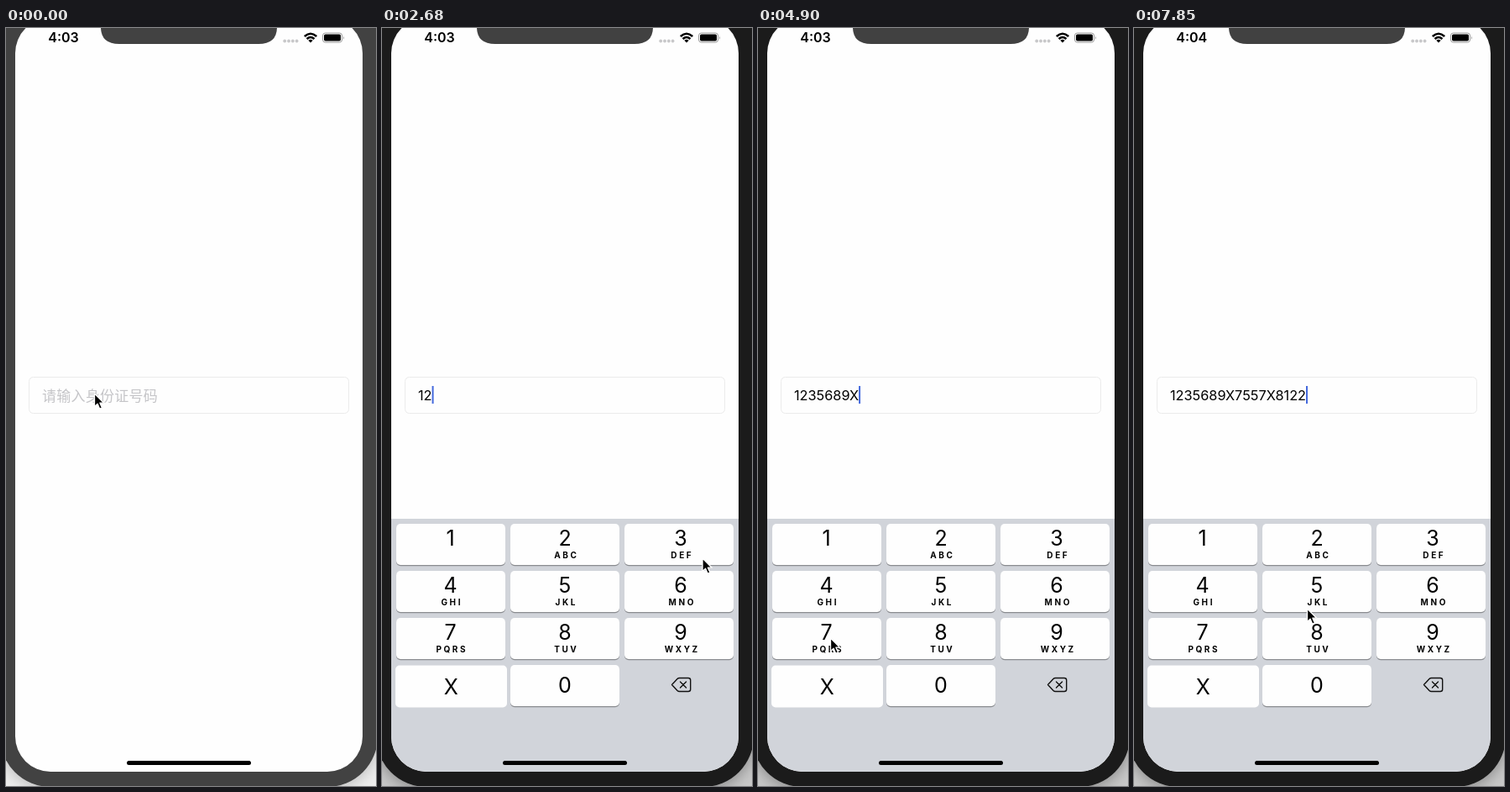
Write an HTML page that moves like this. It is 441x902 px and loops after 8 s.

```html
<!DOCTYPE html>
<html lang="zh-CN">
<head>
<meta charset="utf-8">
<title>ID keyboard</title>
<style>
  html, body { margin: 0; width: 100%; height: 100%; overflow: hidden; background: #ddd; }
  svg { display: block; width: 441px; height: 902px; font-family: Inter, Roboto, sans-serif; }
  .digit { font-size: 25px; text-anchor: middle; }
  .letters { font-size: 10px; font-weight: 700; letter-spacing: 2.6px; text-anchor: middle; }
  #hint { font: 17px "Noto Sans CJK SC", "Noto Sans CJK", sans-serif; letter-spacing: .25px; fill: #c5c5c8; }
  #entry { font-size: 16.3px; }
  #clock { font-size: 16px; font-weight: 600; }
</style>
</head>
<body>
<svg viewBox="0 0 441 902">
  <defs>
    <clipPath id="screen"><rect x="11" y="-12" width="414" height="897" rx="42"/></clipPath>
    <filter id="blur" x="-20%" y="-20%" width="140%" height="140%"><feGaussianBlur stdDeviation="9"/></filter>
  </defs>
  <rect id="desk" width="441" height="902"/>
  <rect id="shade" x="-7" y="-60" width="450" height="966" rx="60" filter="url(#blur)"/>
  <rect id="bezel" x="-7" y="-60" width="450" height="963" rx="60"/>
  <g clip-path="url(#screen)">
    <rect width="441" height="902" fill="#fefefe"/>
    <rect x="27.5" y="415.5" width="381" height="43" rx="5" fill="#fefefe" stroke="#ebebeb"/>
    <text id="hint" x="43" y="443.5">请输入身份证号码</text>
    <text id="entry" x="43" y="442.5"></text>
    <rect id="caret" y="426" width="2" height="21" fill="#4469dd"/>
    <g id="keyboard"><rect x="11" width="414" height="330" fill="#d1d4da"/></g>
    <rect x="144" y="872" width="148" height="5" rx="2.5"/>
  </g>
  <path id="notch" d="M113 -5V-1Q113 19 135 19H301Q323 19 323 -1V-5Z"/>
  <text id="clock" x="50.3" y="17.4"></text>
  <g id="signal" fill="#c8c8ca"></g>
  <g fill="none" stroke="#000" stroke-width="2.5">
    <path d="M355.8 10Q363 3.6 370.2 10M358.5 13Q363 9 367.5 13"/>
    <path d="M360.3 14.7Q363 12.6 365.7 14.7L363 17.4Z" fill="#000" stroke="none"/>
  </g>
  <rect x="377.5" y="6" width="23" height="11" rx="3" fill="none" stroke="#999"/>
  <rect x="379" y="7.5" width="20" height="8" rx="1.7"/>
  <path d="M402 9.5Q403.6 11.5 402 13.5Z" fill="#999"/>
  <g id="pointer">
    <circle id="ring" cx="1.5" cy="2" r="10" fill="#fff" fill-opacity=".28" stroke="#26292d"/>
    <path d="M0 0V15.5L3.6 12.2L6.2 18.2L9 17L6.4 11.2H11.2Z" stroke="#fff" stroke-width="1.3" stroke-linejoin="round"/>
  </g>
</svg>
<script>
const LOOP = 8000, START = 900, STEP = 147.8;
const $ = id => document.getElementById(id);

function add(parent, tag, attrs, text) {
  const el = document.createElementNS('http://www.w3.org/2000/svg', tag);
  for (const k in attrs) el.setAttribute(k, attrs[k]);
  if (text) el.textContent = text;
  return parent.appendChild(el);
}

// Step of each press, the key, and whether the press is seen
const taps = [
  [8, '1', 1], [10, '2', 1], [13, '3', 1], [16, '5', 1], [18, '6', 1], [20, '8', 1],
  [22, '9', 1], [24, 'X', 1], [28, '7', 1], [31, '5', 1], [33, '5', 1], [35, '7', 0],
  [38, 'X', 0], [40, '8', 1], [42, '1', 0], [44, '2', 1], [45, '2', 0]
];

// Pointer stops: step, x, y
const stops = [
  [5, 105.5, 435], [7, 97, 600], [8, 95, 612], [10, 225, 614], [12, 382, 631],
  [13, 382, 631], [15, 232, 668], [16, 230, 668], [18, 380.5, 672], [20, 232, 728],
  [22, 370, 730], [23, 70, 761], [24, 72, 774], [25, 76, 774], [27, 86.5, 726],
  [28, 86.5, 726], [29, 86.5, 726], [31, 226, 674], [33, 226, 676], [34, 149.5, 737],
  [35, 95, 742], [37, 77, 766], [38, 77, 766], [39, 82, 737], [40, 215, 720],
  [42, 73, 612], [44, 212, 614], [46, 212, 616], [47, 206.5, 691]
];

const keyFill = {};
function buildKeyboard() {
  const board = $('keyboard');
  const centers = [81.5, 218, 356];
  const letters = ['', 'ABC', 'DEF', 'GHI', 'JKL', 'MNO', 'PQRS', 'TUV', 'WXYZ'];
  const key = (name, x, y, w, h) => {
    keyFill[name] = add(board, 'rect', { x, y, width: w, height: h, rx: 5 });
  };
  for (let i = 0; i < 11; i++) {
    const col = i % 3, row = Math.floor(i / 3), y = 6 + 56 * row;
    if (i === 9) {
      key('X', 16, 174.5, 133, 50);
      add(board, 'text', { x: 82.3, y: 208.5, class: 'digit' }, 'X');
      continue;
    }
    const name = i === 10 ? '0' : String(i + 1);
    const x = 17 + 136 * col;
    add(board, 'rect', { x, y: y + 1, width: 130, height: 49.2, rx: 5, fill: '#898b8f' });
    key(name, x, y, 130, 49);
    add(board, 'text', { x: centers[col], y: y + (i === 10 ? 32.5 : 26.2), class: 'digit' }, name);
    if (letters[i])
      add(board, 'text', { x: centers[col] + 1.8, y: y + 40.8, class: 'letters' }, letters[i]);
  }
  add(board, 'path', {
    d: 'M345.5 197.5L352 190.5Q353 189.5 354.5 189.5H365Q367.7 189.5 367.7 192V203Q367.7 205.5 365 205.5H354.5Q353 205.5 352 204.5ZM355.5 194L362.5 201M362.5 194L355.5 201',
    fill: 'none', stroke: '#111', 'stroke-width': 1.4, 'stroke-linecap': 'round', 'stroke-linejoin': 'round'
  });
}

function pointerAt(step) {
  if (step <= stops[0][0]) return stops[0].slice(1);
  const i = stops.findIndex(s => s[0] >= step);
  if (i < 0) return stops[stops.length - 1].slice(1);
  const a = stops[i - 1], b = stops[i], f = (step - a[0]) / (b[0] - a[0]);
  return [a[1] + (b[1] - a[1]) * f, a[2] + (b[2] - a[2]) * f];
}

function keyboardTop(step) {
  const u = Math.max(0, step * 148 - 250) / 1000 * 18.5;
  return Math.round(584 + 301 * (1 + u) * Math.exp(-u));
}

function draw(t) {
  const step = Math.floor((t - START) / STEP);
  const active = step >= 0;
  const body = active ? '#1b1b1b' : '#424242';
  $('bezel').setAttribute('fill', body);
  $('notch').setAttribute('fill', active ? '#414141' : '#424242');
  $('desk').setAttribute('fill', active ? '#c9c9c9' : '#eeeeee');
  $('shade').setAttribute('fill', active ? '#858585' : '#bababa');
  $('clock').textContent = step < 36 ? '4:03' : '4:04';

  const typed = taps.filter(p => p[0] < step).map(p => p[1]).join('');
  const entry = $('entry');
  entry.textContent = typed;
  $('hint').style.display = typed ? 'none' : '';
  $('caret').style.display = step >= 2 ? '' : 'none';
  $('caret').setAttribute('x', 43 + (typed ? entry.getComputedTextLength() : 0));

  $('keyboard').setAttribute('transform', `translate(0 ${keyboardTop(step)})`);
  const tap = taps.find(p => p[0] === step && p[2]);
  for (const k in keyFill)
    keyFill[k].setAttribute('fill', tap && tap[1] === k ? '#b4c0ce' : '#fefefe');

  $('pointer').setAttribute('transform', `translate(${pointerAt(step)})`);
  $('ring').style.display = tap || step === 0 || step === 1 ? '' : 'none';
}

for (let i = 0; i < 4; i++) add($('signal'), 'circle', { cx: 332.2 + 4.8 * i, cy: 15.5, r: 1.9 });
buildKeyboard();
const begin = performance.now();
function tick() {
  draw((performance.now() - begin) % LOOP);
  requestAnimationFrame(tick);
}
tick();
</script>
</body>
</html>
```
